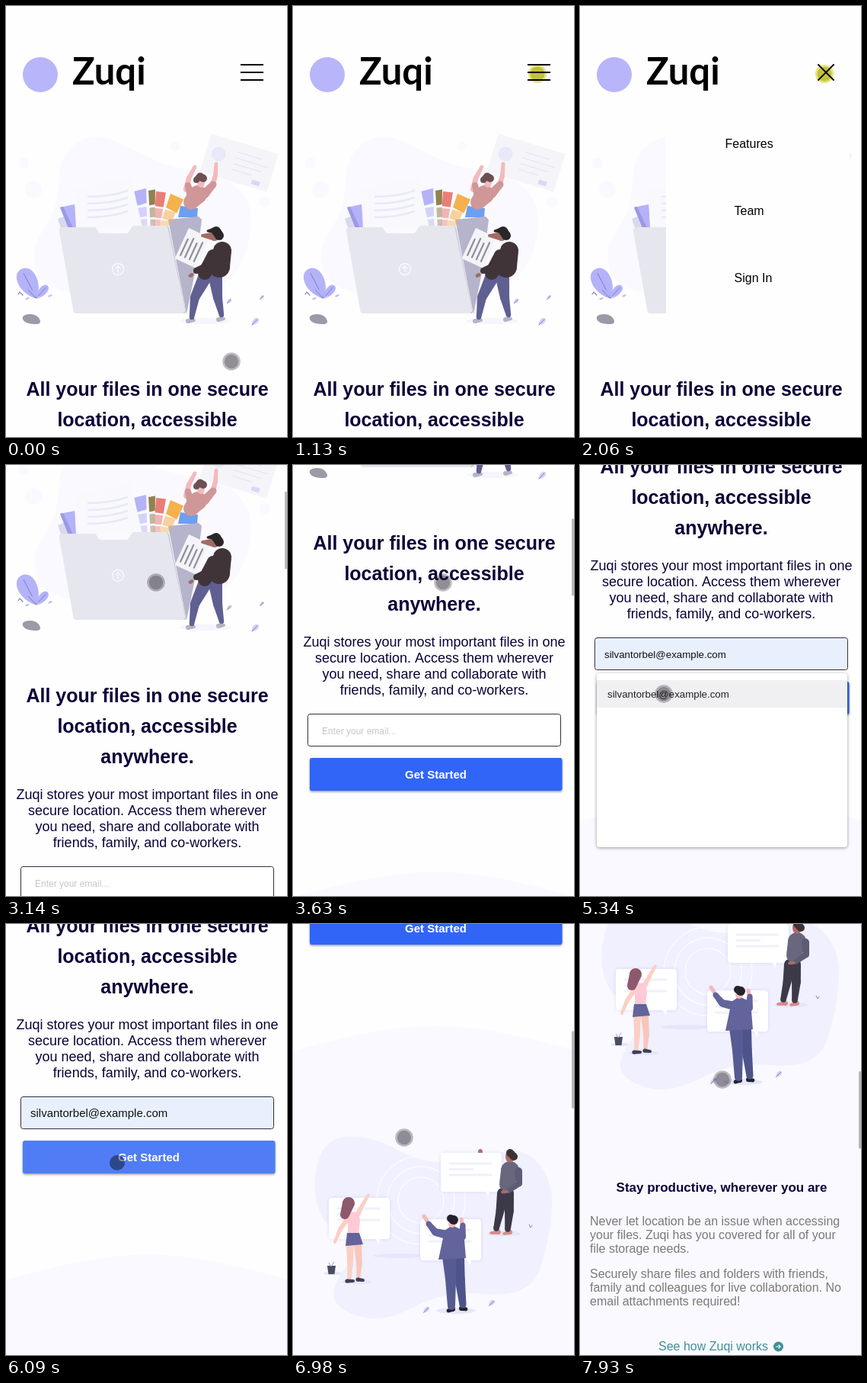
These frames come from a looping animation (369x565 px, 8 s). An HTML page with a canvas:

```html
<!DOCTYPE html>
<html lang="en">
<head>
<meta charset="utf-8">
<title>Landing page walkthrough</title>
<style>
html, body { margin: 0; width: 100%; height: 100%; overflow: hidden; background: #fefefe; }
canvas { display: block; width: 369px; height: 565px; }
</style>
</head>
<body>
<canvas id="stage"></canvas>
<script>
const W = 369, H = 565, LOOP = 8000;
const BRAND = 'Zuqi', EMAIL = 'silvantorbel@example.com';
const SANS = '"Liberation Sans", Arial, sans-serif';
const PAPER = '#fefefe', MIST = '#f9f9ff', NAVY = '#0b0237', GREY = '#7d7878', TEAL = '#3f9096';
const LILAC = '#b5b3f8', VIOLET = '#7472c4', SKIN = '#fbcfc4';
const canvas = document.getElementById('stage');
const c = canvas.getContext('2d');
const dpr = window.devicePixelRatio || 1;
canvas.width = W * dpr;
canvas.height = H * dpr;

// Motion
const within = (t, a, b) => t >= a && t < b;
function ease(t, from, to) {
  const p = Math.min(1, Math.max(0, (t - from) / (to - from)));
  return p * p * (3 - 2 * p);
}
const pulse = (t, a, b, d, e) => ease(t, a, b) - ease(t, d, e);

function scrollAt(t) {
  let y = 0;
  const wheel = (start, turns, gap) => {
    for (let i = 0; i < turns; i++) y += 100 * ease(t, start + i * gap, start + i * gap + 155);
  };
  wheel(2520, 5, 320);
  wheel(6300, 3, 240);
  wheel(7110, 3, 240);
  return Math.round(y);
}

function pointerAt(t) {
  let x = 296, y = 466;
  const move = (from, to, px, py) => {
    const k = ease(t, from, to);
    x += (px - x) * k;
    y += (py - y) * k;
  };
  move(70, 520, 312, 26);
  move(520, 870, 321, 89);
  move(2480, 2810, 197, 154);
  move(3900, 4340, 123, 244);
  move(4860, 5250, 110, 300);
  move(5680, 5890, 146, 313);
  move(6290, 6500, 146, 280);
  move(7110, 7600, 181, 214);
  move(7929, 7930, 187, 204);
  return [x, y];
}

const clicking = t => within(t, 1130, 1330) || within(t, 2060, 2200) ||
  within(t, 4420, 4530) || within(t, 5540, 5680);

// Drawing helpers; points are flat x, y lists
function fill(color) { c.fillStyle = color; c.fill(); }
function trace(p) {
  c.beginPath();
  for (let i = 0; i < p.length; i += 2) c.lineTo(p[i], p[i + 1]);
}
function poly(color, ...p) { trace(p); c.closePath(); fill(color); }
function line(color, width, ...p) {
  trace(p);
  c.strokeStyle = color;
  c.lineWidth = width;
  c.lineCap = c.lineJoin = 'round';
  c.stroke();
}
function blob(color, ...p) {
  const n = p.length, mid = i => [(p[i % n] + p[(i + 2) % n]) / 2, (p[(i + 1) % n] + p[(i + 3) % n]) / 2];
  c.beginPath();
  c.moveTo(...mid(n - 2));
  for (let i = 0; i < n; i += 2) c.quadraticCurveTo(p[i], p[i + 1], ...mid(i));
  fill(color);
}
function oval(color, x, y, rx, ry = rx, turn = 0) {
  c.beginPath();
  c.ellipse(x, y, rx, ry, turn, 0, Math.PI * 2);
  fill(color);
}
function ring(color, width, x, y, r) {
  c.beginPath();
  c.arc(x, y, r, 0, Math.PI * 2);
  c.strokeStyle = color;
  c.lineWidth = width;
  c.stroke();
}
// Rounded limb along joints whose radius runs from r0 to r1
function limb(color, r0, r1, ...p) {
  const last = p.length / 2 - 1, radius = i => r0 + (r1 - r0) * i / last;
  for (let i = 0; i <= last; i++) {
    const x = p[2 * i], y = p[2 * i + 1], r = radius(i);
    oval(color, x, y, r);
    if (i === last) break;
    const X = p[2 * i + 2], Y = p[2 * i + 3], R = radius(i + 1), len = Math.hypot(X - x, Y - y);
    const nx = (y - Y) / len, ny = (X - x) / len;
    poly(color, x + nx * r, y + ny * r, X + nx * R, Y + ny * R, X - nx * R, Y - ny * R, x - nx * r, y - ny * r);
  }
}
function box(color, x, y, w, h, r = 0) {
  c.beginPath();
  c.roundRect(x, y, w, h, r);
  fill(color);
}
function shadowBox(color, blur, dy, ...rect) {
  c.save();
  c.shadowColor = `rgba(0,0,0,.4)`;
  c.shadowBlur = blur * dpr;
  c.shadowOffsetY = dy * dpr;
  box(color, ...rect);
  c.restore();
}
function tilted(x, y, turn, paint) {
  c.save();
  c.translate(x, y);
  c.rotate(turn);
  paint();
  c.restore();
}
function text(s, x, y, size, color, align = 'left', weight = 400, family = SANS) {
  c.font = `${weight} ${size}px ${family}`;
  c.textAlign = align;
  c.fillStyle = color;
  c.fillText(s, x, y);
}
function lines(rows, x, y, step, ...style) {
  rows.forEach((s, i) => text(s, x, y + i * step, ...style));
}
function leaf(color, x, y, length, width, turn, vein = VIOLET) {
  tilted(x, y, turn, () => {
    c.beginPath();
    c.moveTo(0, 0);
    c.bezierCurveTo(length * .3, -width, length, -width, length, 0);
    c.bezierCurveTo(length, width, length * .3, width, 0, 0);
    fill(color);
    line(vein, .8, 0, 0, length * .85, 0);
  });
}
const sprig = (x, y, size) => leaf('#d2d1f8', x - size * .7, y + size * .7, size * 2, size * .75, -.8);

// First illustration
function certificate() {
  tilted(306, 205.5, .297, () => {
    box('#f5f5f9', -46, -26, 92, 52);
    oval('#e8e8f9', -29, -3, 9.5);
    for (let i = 0; i < 4; i++) line('#e8e8f6', 1.6, -6, -13 + i * 8, [27, 37, 31, 20][i], -13 + i * 8);
    box('#d8d8fa', 23, 16, 11, 6);
  });
}

function climber() {
  const shirt = '#d09798', skin = '#f3babc';
  limb(skin, 4, 2.4, 237, 240, 240, 226, 248, 211);
  limb(skin, 3.6, 2.4, 271, 236, 275, 222, 276, 207);
  poly('#6d9ff0', 229, 262, 252, 265, 251, 277, 226, 277);
  limb(shirt, 12, 10, 252, 247, 243, 257);
  limb(shirt, 5, 4, 242, 246, 239, 235);
  limb(shirt, 6, 4.5, 261, 246, 272, 234);
  oval(skin, 256, 231, 5, 7);
  limb('#6b5054', 4, 5, 250, 228, 255, 223, 259, 226);
}

function carrier() {
  const pants = '#5f5f92', coat = '#403439', skin = '#a06b63', cap = '#2b2629';
  oval('#f5f5fb', 262, 413, 34, 4);
  limb('#b5b4c7', 3, 2, 239, 413, 247, 412);
  limb('#b5b4c7', 3, 2, 279, 411, 286, 410);
  limb(pants, 9, 3.2, 275, 356, 278, 382, 283, 405);
  limb(pants, 9, 3.2, 261, 356, 248, 382, 244, 408);
  tilted(240, 291, .43, () => {
    box('#f4f4f8', 0, 0, 30, 44);
    for (let i = 0; i < 4; i++) line('#8f8e9a', 2.2, 5 + i * 6.5, 14 - i % 2 * 4, 5 + i * 6.5, 37);
  });
  limb(coat, 12, 14, 284, 321, 280, 342);
  limb(coat, 8, 9, 272, 327, 261, 350);
  limb(coat, 6, 4, 274, 330, 262, 342, 250, 347);
  oval(skin, 243, 353, 3.6, 2.4, -.6);
  limb(skin, 2, 6, 258, 301, 274, 302);
  limb(cap, 6, 6, 276, 295, 280, 301);
  limb(cap, 1.4, 4, 265, 295, 274, 294);
}

function swatch(color, x, y, width, slant) {
  // Three fading cells that narrow toward the folder
  [[0, .4, 1], [.46, .72, .55], [.77, 1, .45]].forEach(([a, b, alpha]) => {
    const left = k => x + slant * k, right = k => left(k) + width * (1 - k * .4);
    const top = y + (291 - y) * a, low = y + (291 - y) * b, tilt = -slant * .5 * (1 - a);
    c.globalAlpha = alpha;
    poly(color, left(a), top, right(a), top + tilt, right(b), low + tilt, left(b), low);
  });
  c.globalAlpha = 1;
}

function folder() {
  poly('#b6b4cb', 213, 280, 253, 276, 257, 280, 249, 345, 237, 404);
  poly('#d9d9ec', 68, 279, 78, 275, 88, 291, 72, 291);
  poly('#b4b2f8', 71, 264, 90, 260, 102, 290, 82, 291);
  poly('#9b99e5', 71, 264, 75, 263, 88, 291, 82, 291);
  swatch('#b6b2f7', 168, 243, 16, 8);
  swatch('#928150', 187, 242, 9, 3);
  swatch('#e87e77', 197, 243, 13, -3);
  swatch('#f5b14c', 216, 246, 17, -15);
  poly('#f8f8fd', 89, 239, 164, 224, 179, 290, 92, 291);
  for (let y = 250; y < 285; y += 9) {
    c.beginPath();
    c.moveTo(107, y);
    c.quadraticCurveTo(138, y, 160, y - 8);
    c.strokeStyle = '#e9e9f7';
    c.lineWidth = 2.6;
    c.stroke();
  }
  line('#c5c4d5', 4, 212, 291, 234, 401);
  const front = [118, 290, 122, 298, 160, 298, 166, 288, 212, 288, 236, 403, 89, 403, 69, 290];
  c.beginPath();
  c.moveTo(90, 290);
  for (let i = 0; i < front.length; i += 2) {
    const next = (i + 2) % front.length;
    c.arcTo(front[i], front[i + 1], front[next], front[next + 1], 4);
  }
  fill('#e6e7ee');
  ring('#fafaff', 1.3, 147, 345, 7.5);
  line('#fafaff', 1.3, 147, 349, 147, 341);
  line('#fafaff', 1.3, 144, 344, 147, 341, 150, 344);
}

function plant() {
  leaf(LILAC, 40, 383, 43, 17, -2.05);
  leaf(LILAC, 40, 383, 22, 7, -.85);
  leaf(LILAC, 39, 383, 17, 5, -2.3);
  line('#8583ae', 1.2, 16, 378, 18, 375, 22, 379);
  for (let x = 28; x < 60; x += 15) oval('#c5c3f6', x, 387 - x / 8, 3, 1.3, -.4);
  blob('#9b9aa7', 20, 405, 40, 403, 48, 418, 24, 416);
}

function folderArt() {
  blob(MIST, 70, 195, 115, 165, 165, 187, 215, 212, 290, 220, 332, 275, 295, 375, 180, 385, 50, 375, 30, 320, 68, 268);
  oval(MIST, 36, 241, 11);
  oval(MIST, 23, 206, 7);
  oval(MIST, 222, 184, 6);
  oval(MIST, 340, 257, 7);
  certificate();
  climber();
  folder();
  carrier();
  plant();
  sprig(293, 387, 4);
  sprig(336, 382, 3.5);
  sprig(327, 414, 6);
}

// Second illustration
function bubble(x, y, h, tail) {
  c.save();
  c.shadowColor = 'rgba(90,90,200,.16)';
  c.shadowBlur = 4 * dpr;
  box('#fff', x, y, 80, h, 4);
  c.restore();
  poly('#fff', tail, y + h - 1, tail + 6, y + h - 1, tail + 5, y + h + 7);
  for (let i = 0; i < 3; i++) line('#f0f0fd', 3, x + 12, y + 14 + i * 7.5, x + (i === 1 ? 42 : 66), y + 14 + i * 7.5);
}

function woman() {
  oval('#e6e6fa', 84, 469, 20, 3);
  limb(SKIN, 3.5, 2, 75, 382, 62, 400, 55, 417);
  limb(SKIN, 3.5, 1.8, 83, 384, 91, 369, 99, 355);
  limb(SKIN, 5, 2.6, 75, 420, 75, 445, 74, 464);
  limb('#f8c6bb', 5, 2.6, 85, 420, 87, 445, 86, 462);
  limb('#3f4058', 2.6, 2, 71, 468, 79, 468);
  limb('#3f4058', 2.6, 2, 85, 466, 92, 467);
  poly('#ffc9d6', 72, 378, 86, 377, 88, 390, 86, 406, 72, 406);
  poly('#62649b', 71, 405, 87, 405, 92, 420, 69, 422);
  limb('#8e586d', 8, 6, 73, 366, 68, 381);
}

function speaker() {
  const suit = '#62649b', skin = '#f3b9be', dark = '#25222f';
  oval('#e6e6fa', 214, 507, 26, 4);
  limb(dark, 3, 2.4, 210, 505, 204, 507);
  limb(dark, 3, 2.4, 221, 504, 227, 505);
  limb('#4e538a', 9, 4.5, 216, 436, 219, 465, 223, 499);
  limb('#565b93', 9, 5, 205, 436, 207, 465, 208, 501);
  limb(skin, 2.6, 2.6, 172, 383, 176, 389);
  limb(skin, 2.6, 2.6, 221, 387, 222, 393);
  limb(suit, 3.5, 6, 178, 393, 187, 404, 205, 408);
  limb(suit, 3.5, 5, 223, 395, 222, 410);
  poly(suit, 199, 402, 209, 395, 224, 402, 227, 438, 191, 440);
  oval(skin, 209, 393, 5, 5);
  limb(dark, 5, 6, 207, 386, 211, 388);
}

function reacher() {
  const shoe = '#d98a8c', skin = '#ab6b69';
  oval('#e6e6fa', 277, 406, 22, 3.5);
  limb(shoe, 1.8, 3, 260, 405, 270, 404);
  limb(shoe, 1.8, 3, 277, 406, 285, 404);
  limb('#3c3949', 7, 3.8, 275, 353, 272, 376, 267, 399);
  limb('#3c3949', 8, 3.8, 282, 353, 284, 376, 282, 400);
  limb('#68677e', 12, 10, 285, 323, 281, 341);
  limb('#5d5c74', 5, 3, 296, 324, 297, 340, 283, 350);
  oval(skin, 278, 351, 5, 2.2, -.1);
  oval(skin, 285, 305, 6, 8);
  limb('#3d3335', 5, 5, 285, 300, 290, 305);
}

function teamArt() {
  blob('#f0f0fe', 25, 335, 45, 277, 110, 280, 168, 314, 240, 310, 300, 290, 342, 335, 338, 410, 312, 490, 200, 480, 115, 525, 48, 500, 60, 458, 90, 430, 36, 390);
  for (let r = 30; r < 60; r += 14) ring('#fafaff', 1.6, 168, 362, r);
  oval('#e6e6fa', 140, 435, 34, 3);
  bubble(47, 359, 54, 108);
  oval('#b3707a', 246, 299, 3, 4);
  bubble(194, 300, 51, 252);
  bubble(167, 387, 54, 228);
  woman();
  speaker();
  reacher();
  oval('#e6e6fa', 52, 458, 12, 2.5);
  poly('#4b4d60', 45, 448, 56, 448, 54.5, 459, 46.5, 459);
  line('#9a99cc', 1, 47, 444, 50, 449, 54, 443);
  line('#8b8ab8', 1, 310, 394, 312, 398, 314, 395);
  sprig(175, 506, 5);
  sprig(261, 497, 5);
}

// Page parts
function header(open) {
  oval('#b8b5fb', 45, 90, 23);
  text(BRAND, 87, 103, 49, '#000', 'left', 700, 'Lato, sans-serif');
  for (const k of [-1, 0, 1]) {
    tilted(323, 87 + k * 10 * (1 - open), k * open * Math.PI / 4, () => {
      box(`rgba(0,0,0,${k ? 1 : 1 - open})`, -15, -1, 30, 2);
    });
  }
}

function menu(open) {
  c.globalAlpha = open;
  box(PAPER, 113, 150, 241, 275);
  text('Features', 190.5, 186, 16, '#000');
  lines(['Team', 'Sign In'], 202.5, 274, 88, 16, '#000');
  c.globalAlpha = 1;
}

function form(t) {
  const filled = t >= 5300, shown = pulse(t, 4500, 4530, 5680, 5890);
  c.strokeStyle = '#33303f';
  c.lineWidth = 1;
  c.beginPath();
  c.roundRect(19.5, 726.5, 332, 42, 3);
  fill(filled ? '#e8f0fe' : '#fff');
  c.stroke();
  if (filled) text(EMAIL, 32, 753, t < 6040 ? 13.3 : 15, '#111');
  else text('Enter your email...', 38, 752.5, 12, '#c9c7c5');

  shadowBox(within(t, 6040, 6400) ? '#507df5' : '#3065f8', 3, 1.5, 22, 784, 331.5, 43, 3);
  text('Get Started', 187.5, 811, 15, '#fff', 'center', 700);

  if (!shown) return;
  c.globalAlpha = shown;
  shadowBox('#fff', 4, 1, 22, 773, 329, 228, 4);
  if (t > 5200) box('#f0f0f2', 22, 782, 329, 36);
  text(EMAIL, 36, 805, 13.3, '#222');
  c.globalAlpha = 1;
}

function article() {
  text('Stay productive, wherever you are', 186, 1451, 17, NAVY, 'center', 700);
  lines(['Never let location be an issue when accessing', 'your files. ' + BRAND + ' has you covered for all of your',
    'file storage needs.'], 13, 1495, 18, 16, GREY);
  lines(['Securely share files and folders with friends,', 'family and colleagues for live collaboration. No',
    'email attachments required!'], 13, 1564, 18, 16, GREY);
  text('See how ' + BRAND + ' works', 103, 1659, 16, TEAL);
  oval(TEAL, 260.5, 1654, 6.5);
  line(MIST, 1.2, 257.5, 1654, 263, 1654);
  line(MIST, 1.2, 261, 1652, 263, 1654, 261, 1656);
}

function page(t) {
  const open = pulse(t, 1130, 1540, 2090, 2460);
  header(open);
  folderArt();
  menu(open);

  c.beginPath();
  c.moveTo(0, 967);
  c.bezierCurveTo(75, 945, 135, 933.5, 187, 933.5);
  c.bezierCurveTo(240, 933.5, 300, 946, W, 966);
  c.lineTo(W, 1700);
  c.lineTo(0, 1700);
  fill(MIST);

  lines(['All your files in one secure', 'location, accessible', 'anywhere.'], 185.5, 511, 40, 25, NAVY, 'center', 700);
  lines([BRAND + ' stores your most important files in one', 'secure location. Access them wherever',
    'you need, share and collaborate with', 'friends, family, and co-workers.'], 185.5, 638, 21, 18, NAVY, 'center');
  form(t);
  tilted(0, 800, 0, teamArt);
  article();
}

function pointer(t) {
  const [x, y] = pointerAt(t);
  if (clicking(t)) {
    c.globalCompositeOperation = 'multiply';
    oval('#e6e67c', x, y, 12);
    oval('#d8d878', x, y, 9.5);
    c.globalCompositeOperation = 'source-over';
  } else if (within(t, 6090, 6290)) {
    oval('rgba(0,0,0,.43)', x, y, 10);
  } else {
    oval('rgba(10,5,20,.26)', x, y, 11.8);
    oval('rgba(10,5,25,.25)', x, y, 9.2);
  }
}

function draw(t) {
  const scroll = scrollAt(t);
  const bar = pulse(t, 2470, 2510, 4230, 4560) + ease(t, 6300, 6360);
  c.setTransform(dpr, 0, 0, dpr, 0, 0);
  box(PAPER, 0, 0, W, H);
  tilted(0, -scroll, 0, () => page(t));
  box(`rgba(100,100,108,${.45 * bar})`, 366, scroll * .1757, 3, 101);
  pointer(t);
}

const start = performance.now();
function tick() {
  draw((performance.now() - start) % LOOP);
  requestAnimationFrame(tick);
}
tick();
</script>
</body>
</html>
```
